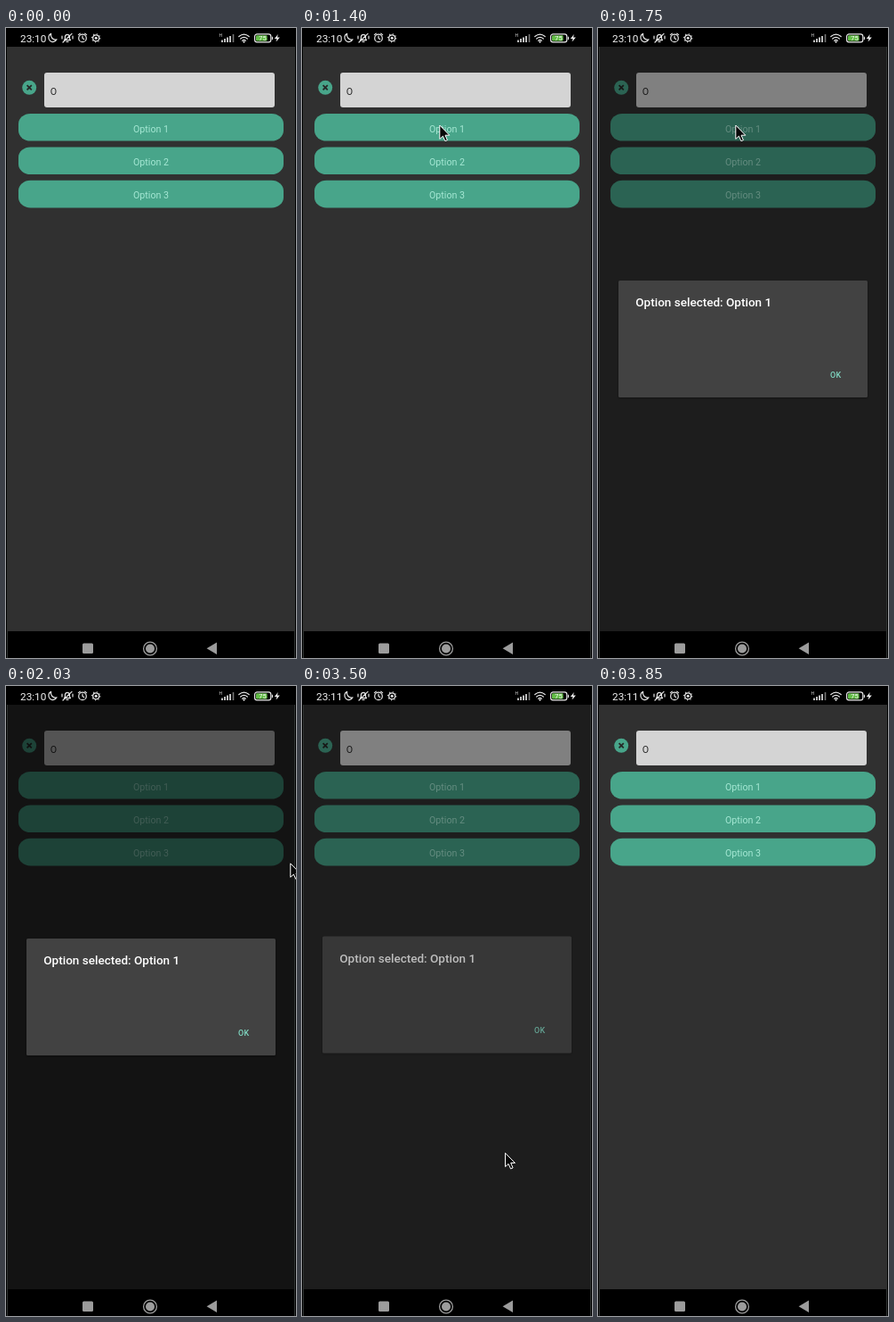
Animation of 326x706 px, one loop 4060 ms. Source, as an HTML page:

```html
<!DOCTYPE html>
<html lang="en">
<head>
<meta charset="utf-8">
<title>Option picker</title>
<style>
  html, body { margin: 0; width: 100%; height: 100%; overflow: hidden; background: #000; }
  svg { display: block; width: 326px; height: 706px; font-family: Roboto, sans-serif; }
  .line { fill: none; stroke: #e8e8e8; stroke-width: 1.2; stroke-linecap: round; stroke-linejoin: round; }
  .dashed { stroke-dasharray: 1 2.61; stroke-linecap: butt; }
  #buttons rect { fill: #48a58a; }
  #buttons text { fill: #a5e8d4; font-size: 10.7px; text-anchor: middle; }
  #dialog { transform-box: fill-box; transform-origin: center; }
  #panel { filter: drop-shadow(0 1px 1px rgba(0, 0, 0, .35)); }
</style>
</head>
<body>
<svg viewBox="0 0 326 706">
  <rect width="326" height="706"/>
  <path d="M1.5 21V706M324.5 21V706" stroke="#303332"/>
  <rect x="2" y="21" width="322" height="655" fill="#303030"/>

  <g id="status">
    <text id="clock" x="16" y="15.6" font-size="11.8" fill="#f2f2f2">23:10</text>
    <path class="line" d="M50.6 6.4A4.8 4.8 0 1 0 57 12.8A5.2 5.2 0 0 1 50.6 6.4Z"/>
    <path class="line" d="M65.5 13.6H72.5L71.5 12V9.6A2.6 2.8 0 0 0 66.4 9.6V12ZM68 15.5H70M74 6.4L64 16M63 9V12M75 9V12"/>
    <circle class="line" cx="86" cy="11.4" r="4.3"/>
    <path class="line" d="M86 9V11.6L87.7 12.6M81.4 7.6L83.2 6.2M90.6 7.6L88.8 6.2"/>
    <circle class="line" cx="101.2" cy="11.3" r="3.5"/>
    <circle class="line dashed" cx="101.2" cy="11.3" r="4.6"/>
    <circle cx="101.2" cy="11.3" r="1.5" fill="#e8e8e8"/>

    <text x="239.5" y="9.5" font-size="5" fill="#ddd">H</text>
    <path d="M243 16V13.5M246 16V12M249 16V10.5M252 16V9" stroke="#eee" stroke-width="1.6"/>
    <path d="M255.5 16V7" stroke="#777" stroke-width="1.6"/>
    <path class="line" d="M261.8 9.5Q267.5 4.8 273.2 9.5M263.7 12Q267.5 8.8 271.3 12M265.6 14.2Q267.5 12.7 269.4 14.2"/>
    <circle cx="267.5" cy="15.6" r="1.1" fill="#eee"/>
    <rect class="line" x="279.6" y="6.8" width="18.2" height="9" rx="2.6"/>
    <rect x="281" y="8.2" width="12.6" height="6.2" rx="1.2" fill="#62bd46"/>
    <path d="M299.4 9.8V13" stroke="#ddd" stroke-width="1.2"/>
    <text x="288.5" y="14" font-size="7.4" text-anchor="middle" fill="#fff">75</text>
    <path d="M305.8 7L301.8 12H304.4L303.6 15.6L307.8 10.4H305Z" fill="#f2f2f2"/>
  </g>

  <circle cx="26.2" cy="66.8" r="8" fill="#48a58a"/>
  <path d="M23.6 64.2L28.8 69.4M28.8 64.2L23.6 69.4" stroke="#262626" stroke-width="1.8"/>
  <rect x="43" y="50" width="259" height="39" rx="3" fill="#d4d4d4"/>
  <text x="49.8" y="74.8" font-size="10.7" fill="#262626">O</text>

  <g id="buttons"></g>
  <rect id="dim" x="2" y="21" width="322" height="655"/>

  <g id="dialog">
    <rect id="panel" x="23" y="283" width="280" height="131" rx="1.5" fill="#424242"/>
    <text x="42.3" y="312" font-size="13.5" font-weight="500" fill="#fff">Option selected: Option 1</text>
    <text x="267.2" y="391.7" font-size="9" font-weight="500" letter-spacing=".3" text-anchor="middle" fill="#80d8c2">OK</text>
  </g>

  <g id="nav" fill="#9c9c9c">
    <rect x="86" y="689.5" width="12" height="11.5" rx="1.5"/>
    <circle cx="162" cy="695.5" r="5"/>
    <circle cx="162" cy="695.5" r="7.4" fill="none" stroke="#9c9c9c" stroke-width="1.3"/>
    <path d="M225.6 695.3L237 688.5V702.1Z"/>
  </g>

  <path id="cursor" d="M0 0V15.4L3.6 12.2L6.1 17.7L8.6 16.6L6.2 11.2H11Z" fill="#080808" stroke="#fff" stroke-linejoin="round"/>
</svg>
<script>
  const TICK = 70, LOOP = 4060;
  const el = id => document.getElementById(id);
  const clock = el('clock'), dim = el('dim'), dialog = el('dialog'), cursor = el('cursor');

  for (let i = 0; i < 3; i++) {
    const y = 96 + 37.4 * i;
    el('buttons').insertAdjacentHTML('beforeend',
      `<rect x="14" y="${y}" width="298" height="30.6" rx="13.5" ry="11.5"/>
       <text x="163" y="${y + 20.6}">Option ${i + 1}</text>`);
  }

  const ramp = (t, from, to) => Math.min(1, Math.max(0, (t - from) / (to - from)));
  const easeOut = p => 1 - (1 - p) ** 2;
  const easeIn = p => p ** 2.5;
  const mix = (a, b, p) => a.map((v, i) => v + (b[i] - v) * p);

  // Cursor stops; all but the option and the OK button lie off the stage.
  const below = [195, 720], option = [154.8, 109], right = [443, 266];
  const side = [340, 420], ok = [271.5, 388], exit = [142.5, 794];

  function cursorAt(t) {
    if (t < 1750) return mix(below, option, easeOut(ramp(t, 0, 600)));
    if (t < 2240) return mix(option, right, easeIn(ramp(t, 1750, 2100)));
    if (t < 3430) return mix(side, ok, easeOut(ramp(t, 2240, 2800)));
    return mix(ok, exit, ramp(t, 3430, 3640));
  }

  function draw(t) {
    const opened = ramp(t, 1610, 1750), closed = ramp(t, 3430, 3670);
    dim.setAttribute('opacity', .6 * (ramp(t, 1610, 1820) - ramp(t, 3430, 3640)));
    dialog.setAttribute('opacity', opened * (1 - closed));
    dialog.style.transform = `translateY(${-8.5 * closed}px) scale(${.92 + .08 * opened})`;
    cursor.setAttribute('transform', `translate(${cursorAt(t)})`);
    clock.textContent = t < 3500 ? '23:10' : '23:11';
  }

  // The picture advances in ticks, like the screen recording it mimics.
  const start = performance.now();
  function loop(now) {
    const t = Math.max(0, now - start) % LOOP;
    draw(t - t % TICK);
    requestAnimationFrame(loop);
  }
  draw(0);
  requestAnimationFrame(loop);
</script>
</body>
</html>
```
